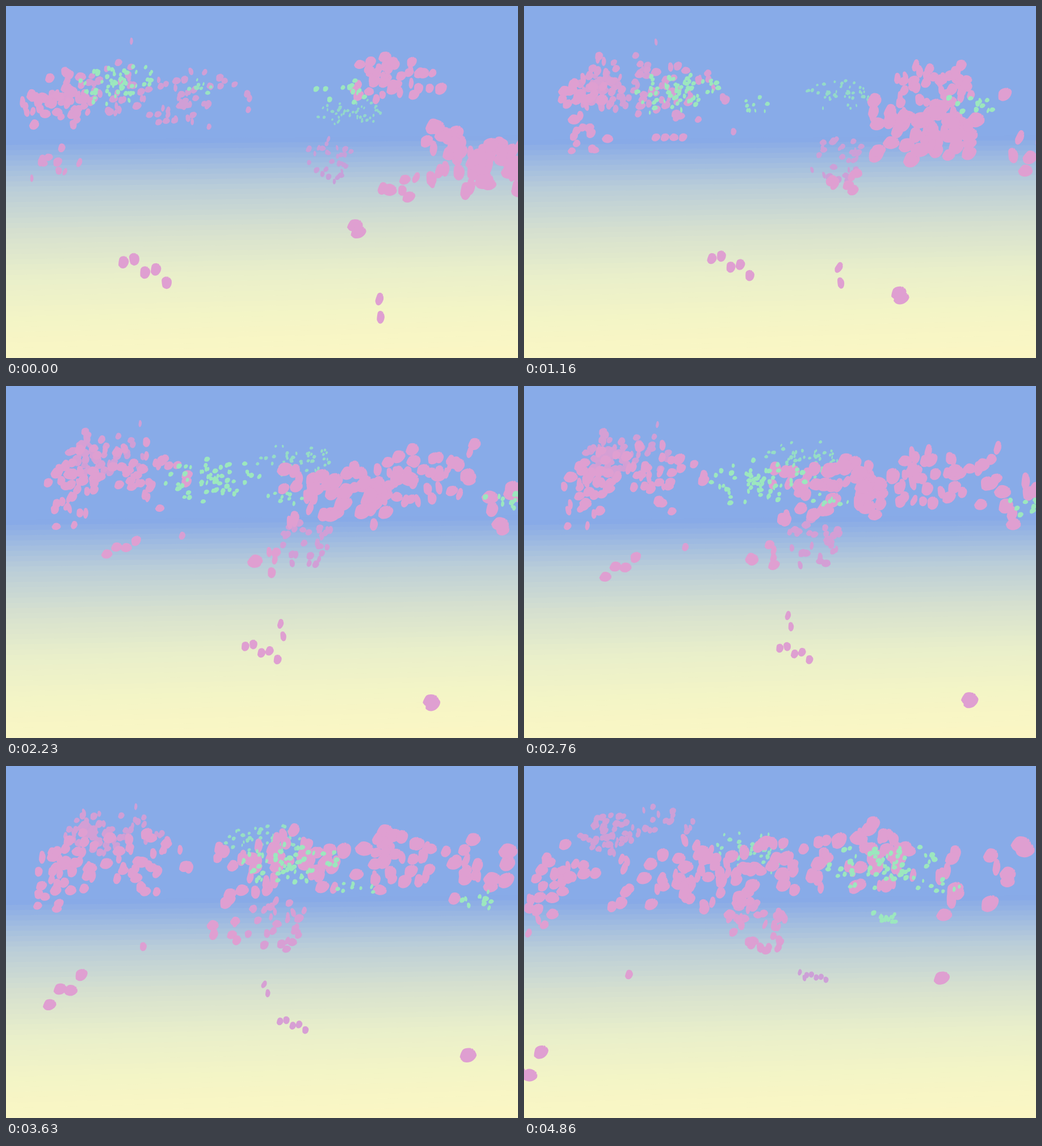
Animation, 902 px wide and 621 px high, one loop 4.96 s. Source, as an HTML page:

```html
<!DOCTYPE html>
<html lang="en">
<head>
<meta charset="utf-8">
<title>Drifting petals</title>
<style>
html, body { margin: 0; width: 100%; height: 100%; overflow: hidden; background: #88abe8; }
svg { display: block; width: 100%; height: 100%; }
</style>
</head>
<body>
<svg id="stage" viewBox="0 0 902 621" preserveAspectRatio="none"></svg>
<script>
const LOOP = 4960, END = 4860, FIRST = 110, STEP = 4750 / 54;
const PETAL = 'M-1 .28C-.95 0-.75-.35-.6-.55C-.3-.78 .1-.76 .45-.68L.5-.55L.57-.66L.76-.5' +
  'L.72-.36L.84-.42Q1-.2 .98 0C.85 .35 .5 .6 .15 .7C-.3 .8-.7 .68-.82 .5Z';
const PINK = [[190, 160, 220], [223, 159, 209]];
const GREEN = [[144, 210, 206], [156, 231, 190]];
const stage = document.getElementById('stage');
const petals = [];

let seed = 41;
function rand(a = 0, b = 1) {
  seed = (seed * 16807) % 2147483647;
  return a + (b - a) * seed / 2147483647;
}
const clamp = x => Math.max(0, Math.min(1, x));
const lerp = (a, b, p) => a + (b - a) * p;
const mix = (a, b, p) => `rgb(${a.map((v, i) => Math.round(lerp(v, b[i], p)))})`;

function addPath(d, fill) {
  const el = document.createElementNS('http://www.w3.org/2000/svg', 'path');
  el.setAttribute('d', d);
  if (fill) el.setAttribute('fill', fill);
  stage.appendChild(el);
  return el;
}

// Slightly slanted bands from blue to cream
function drawSky() {
  const hues = [[136, 170, 231], [184, 204, 217], [214, 224, 207],
    [233, 239, 202], [244, 245, 198], [251, 246, 196]];
  const top = 232, gap = 78;
  addPath('M0 0H902V621H0Z', '#88abe8');
  for (let y = top; y < 622; y += 9) {
    const i = Math.floor((y - top) / gap), tilt = 4 + (y - top) / 50;
    addPath(`M0 ${y + tilt}L902 ${y - tilt}V621H0Z`, mix(hues[i], hues[i + 1], (y - top) / gap - i));
  }
}

// Polynomial through evenly timed points
function along(path, p) {
  const n = path.length - 1;
  let x = 0, y = 0;
  path.forEach((pt, i) => {
    let k = 1;
    for (let j = 0; j <= n; j++) if (j !== i) k *= (p * n - j) / (i - j);
    x += k * pt[0];
    y += k * pt[1];
  });
  return [x, y];
}

function addPetal(path, size, tone, more) {
  petals.push({
    el: addPath(PETAL), path, size, tone,
    lean: rand(-32, 24), phase: rand(0, 6), rate: rand(1, 2.6), grow: 1, sway: 0, ...more
  });
}

// A cloud of tumbling petals; first and last points also hold the half width and height
function flock(n, size, tone, ...path) {
  for (let i = 0; i < n; i++) {
    const a = rand(0, 2 * Math.PI), r = rand() ** .6;
    addPetal(path, size, tone, { u: Math.cos(a) * r, v: Math.sin(a) * r, grow: rand(.85, 1.2), sway: 6 });
  }
}

// A zigzag line of petals that keep their face to the viewer
function row(n, size, face, ...path) {
  for (let i = 0; i < n; i++) {
    const u = n > 1 ? 2 * i / (n - 1) - 1 : 0;
    addPetal(path, size, PINK, { u, v: u, face, zig: n > 2 && i % 2 ? .8 : 0 });
  }
}

function place(el, p) {
  const [x, y] = along(el.path, p);
  const from = el.path[0], to = el.path[el.path.length - 1];
  const rx = lerp(from[2], to[2], p), ry = lerp(from[3], to[3], p);
  const spin = el.phase + el.rate * p * END / 1000;
  const face = el.face || .4 + .6 * Math.abs(Math.cos(spin));
  const w = lerp(...el.size, p), s = w * el.grow / 2;
  const px = x + el.u * rx + el.sway * Math.sin(spin);
  const py = y + el.v * ry - (el.zig || 0) * Math.abs(ry) + el.sway * Math.cos(spin * 1.3);
  const turn = el.lean * face + 8 * Math.sin(spin);
  const near = el.tone === GREEN ? clamp((w - 5) / 4) : clamp((w - 8) / 11);
  el.el.setAttribute('transform', `translate(${px.toFixed(1)} ${py.toFixed(1)}) ` +
    `rotate(${turn.toFixed(1)}) scale(${(s * face).toFixed(2)} ${(s * (1.35 - .3 * face)).toFixed(2)})`);
  el.el.setAttribute('fill', mix(...el.tone, near));
}

function build() {
  drawSky();
  // far
  flock(30, [11, 18], PINK, [567, 272, 44, 38], [520, 276], [415, 285, 55, 46]);
  flock(50, [6, 8], GREEN, [604, 190, 58, 22], [500, 132], [402, 152, 74, 36]);
  // left bank
  flock(28, [15, 13], PINK, [195, 145, 50, 55], [185, 122], [220, 98, 92, 24]);
  flock(36, [18, 14], PINK, [118, 160, 38, 52], [152, 124], [148, 125, 48, 34]);
  flock(22, [20, 23], PINK, [58, 165, 48, 48], [110, 155], [55, 185, 58, 62]);
  flock(10, [17, 22], PINK, [88, 280, 68, 28], [115, 220], [25, 262, 42, 42]);
  flock(18, [14, 24], PINK, [290, 165, 48, 48], [170, 150], [195, 205, 92, 55]);
  flock(24, [14, 24], PINK, [365, 155, 64, 55], [268, 155], [312, 185, 44, 66]);
  // right bank, sweeping left
  flock(32, [20, 27], PINK, [668, 125, 95, 35], [712, 160], [620, 160, 68, 60]);
  flock(12, [21, 29], PINK, [690, 130, 88, 38], [825, 155], [765, 210, 62, 75]);
  flock(12, [30, 28], PINK, [860, 270, 52, 46], [650, 190], [540, 165, 62, 58]);
  flock(26, [32, 26], PINK, [860, 285, 78, 44], [595, 185], [425, 185, 78, 60]);
  flock(16, [30, 23], PINK, [770, 245, 46, 64], [500, 180], [340, 190, 54, 68]);
  flock(6, [25, 21], PINK, [705, 318, 38, 28], [455, 306], [385, 265, 30, 42]);
  flock(6, [30, 32], PINK, [905, 285, 45, 50], [870, 205], [850, 162, 55, 40]);
  // green flights
  flock(9, [8, 9], GREEN, [342, 140, 24, 15], [510, 198], [735, 210, 56, 12]);
  flock(62, [9, 10], GREEN, [194, 137, 66, 34], [380, 168], [630, 176, 100, 38]);
  flock(12, [11, 10], GREEN, [612, 148, 85, 18], [900, 205], [645, 268, 36, 9]);
  // strays
  row(2, [28, 29], 1, [618, 393, 3, 6], [703, 543], [808, 535], [736, 374, 0, 0]);
  row(2, [26, 13], .55, [659, 533, 1, 16], [518, 452], [459, 402], [490, 369, 4, 5]);
  row(5, [26, 13], .75, [245, 470, 38, 18], [410, 465], [495, 468], [515, 373, 17, 4]);
  row(4, [14, 29], .95, [275, 200, 22, 8], [235, 255], [135, 365], [0, 555, 30, -28]);
  row(1, [14, 20], .7, [427, 183, 0, 0], [300, 272], [185, 368, 0, 0]);
  row(1, [14, 13], .42, [221, 62, 0, 0], [236, 67], [211, 78, 0, 0]);
}

function frame() {
  const t = performance.now() % LOOP;
  const held = t < FIRST ? 0 : Math.min(END, FIRST + Math.floor((t - FIRST) / STEP) * STEP);
  for (const el of petals) place(el, held / END);
  requestAnimationFrame(frame);
}

build();
frame();
</script>
</body>
</html>
```
